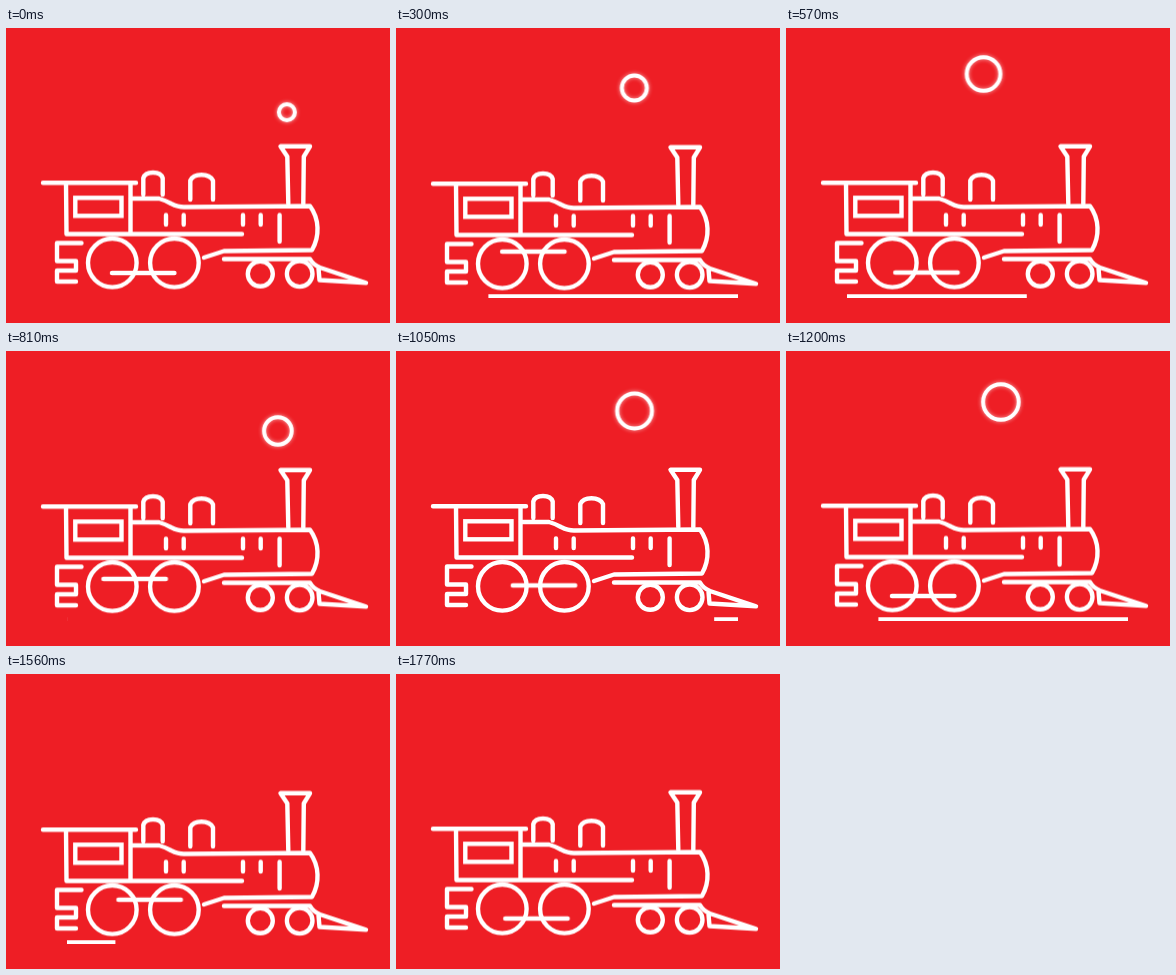
Animation, 384 px wide and 295 px high, one loop 1800 ms. Source, as an HTML page without scripts:

```html
<!DOCTYPE html>
<html lang="en">
<head>
<meta charset="utf-8">
<title>Steam engine</title>
<style>
  html, body { margin: 0; width: 100%; height: 100%; overflow: hidden; background: #ee1e25; }
  svg { position: absolute; left: 0; top: 0; display: block; }
  .art { fill: none; stroke: #fff; stroke-width: 4.4; stroke-linecap: round; stroke-linejoin: round; }

  .engine { animation: bob 300ms cubic-bezier(.37, 0, .63, 1) infinite alternate; }
  @keyframes bob {
    from { transform: translateY(-.5px); }
    to { transform: translateY(.5px); }
  }

  .rod { animation: crank 600ms linear infinite; }
  @keyframes crank {
    from { transform: rotate(90deg) translateX(10.7px) rotate(-90deg); }
    to { transform: rotate(450deg) translateX(10.7px) rotate(-450deg); }
  }

  /* Two puffs per loop */
  .puff {
    stroke-width: 4;
    filter: drop-shadow(0 0 2px rgba(255, 255, 255, .6));
    animation: puff 1800ms linear infinite;
  }
  @keyframes puff {
    0% { transform: translate(281px, 84.3px); r: 8px; opacity: 1; }
    16.667% { transform: translate(238.5px, 60px); r: 12.5px; }
    24.167% { transform: translate(218px, 52px); r: 14.8px; }
    31.667% { transform: translate(197.7px, 46px); r: 16.8px; }
    37.5% { transform: translate(182px, 43.7px); r: 18px; opacity: 1; }
    37.51% { transform: translate(288px, 95px); r: 10px; opacity: 1; }
    45% { transform: translate(272px, 80px); r: 13.8px; }
    58.333% { transform: translate(238.7px, 60px); r: 17.4px; }
    66.667% { transform: translate(215px, 51px); r: 17.8px; }
    76.667% { transform: translate(188px, 44.3px); r: 18px; }
    79% { transform: translate(182px, 43.7px); r: 18px; opacity: 1; }
    79.01%, 100% { transform: translate(182px, 43.7px); r: 18px; opacity: 0; }
  }

  /* The rail grows leftwards, then is wiped leftwards */
  .rail, .rail i {
    position: absolute; width: 281px; height: 4px;
    animation: 900ms cubic-bezier(.65, 0, .35, 1) infinite;
  }
  .rail { left: 61px; top: 266.3px; animation-name: grow; }
  .rail i { left: 0; top: 0; background: #fff; animation-name: wipe; }
  @keyframes grow {
    0%, 6.4% { clip-path: inset(0 0 0 100%); }
    45%, 100% { clip-path: inset(0 0 0 0); }
  }
  @keyframes wipe {
    0%, 41% { clip-path: inset(0 0 0 0); }
    91%, 100% { clip-path: inset(0 100% 0 0); }
  }
</style>
</head>
<body>
<div class="rail"><i></i></div>
<svg class="art" width="384" height="295" viewBox="0 0 384 295">
  <g class="engine">
    <!-- cab -->
    <path d="M37 155.3H130M60 155.3L60.5 206.5H236M124.5 155.3V206"/>
    <rect x="69.3" y="170.3" width="46.2" height="18" stroke-linejoin="miter"/>
    <!-- boiler -->
    <path d="M125 171H153Q160 173 165 176Q172 179.500 178 179.500L304 178.500Q311 188 311.500 200Q312 212 306 222.500L218 223.500L198 230"/>
    <path d="M137.300 167V150.500Q139 145 147 145Q155 145 156.700 150.500V167M184.300 172V153Q187 147.300 195.500 147.300Q204 147.300 207 153V172"/>
    <path d="M160 187.500V197M177.700 187.500V197M237 187.500V197M254.700 187.500V197M273.600 187.500V214"/>
    <!-- chimney -->
    <path d="M282.300 176L281.300 129L274.500 118.800H304L297.800 129L297.300 176"/>
    <!-- coupling and front guard -->
    <path d="M75.500 215.500H51V233.500H70V243H51V254H70"/>
    <path d="M218 231.500H304Q307 237 314 240L360 255.300L313.500 252.500L312.500 241"/>
    <!-- wheels -->
    <circle cx="106.300" cy="235.300" r="24.300"/>
    <circle cx="168.400" cy="235.300" r="24.300"/>
    <circle cx="254.300" cy="246.300" r="12.500"/>
    <circle cx="293.700" cy="246.300" r="12.800"/>
  </g>
  <g transform="translate(106 234.300)">
    <path class="rod" d="M0 0H62.500"/>
  </g>
  <circle class="puff" r="8"/>
</svg>
</body>
</html>
```
